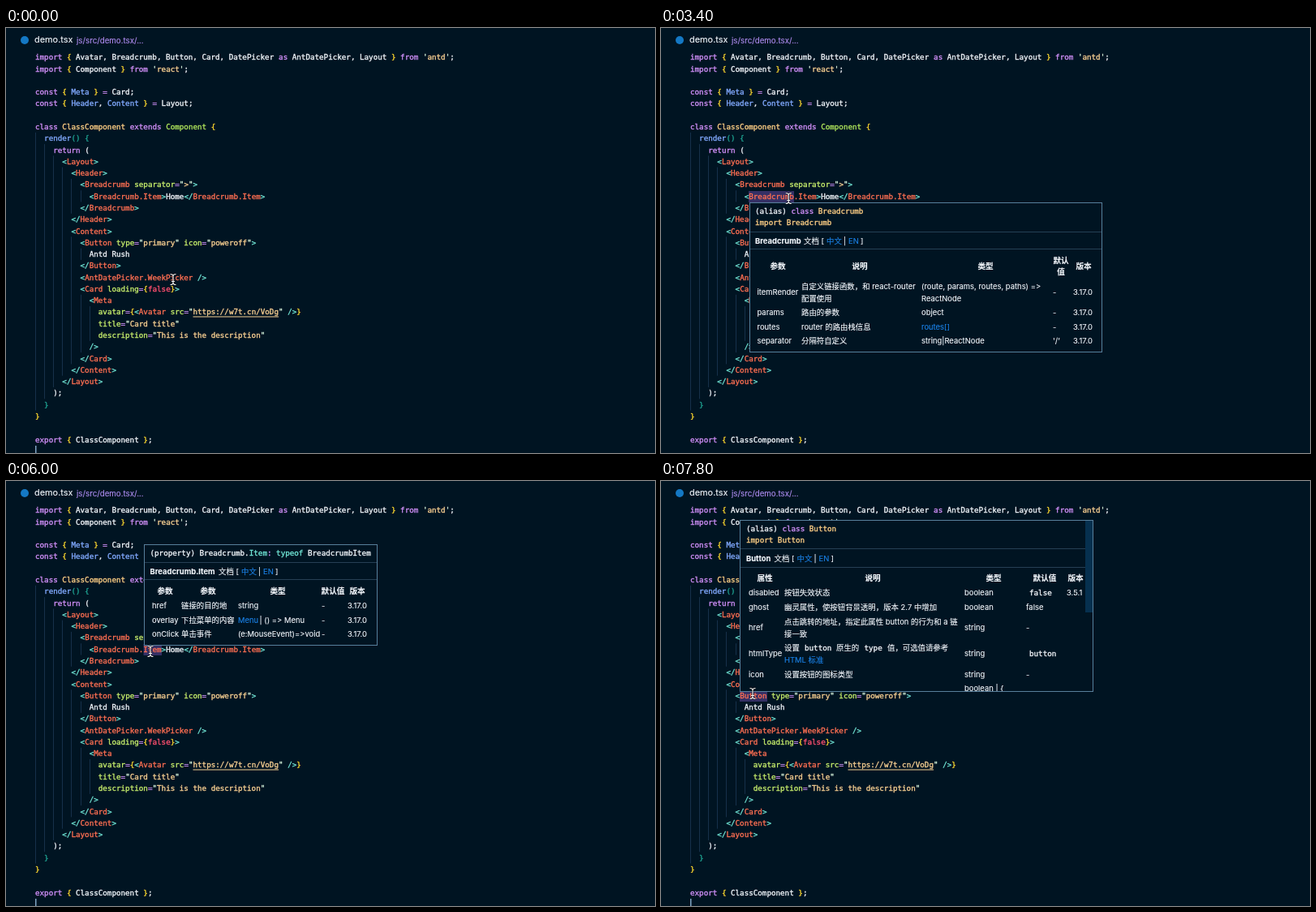
These frames come from a looping animation (800x524 px, 8000 ms). An HTML page with a canvas:

```html
<!DOCTYPE html>
<html lang="en">
<head>
<meta charset="utf-8">
<title>Editor hover docs</title>
<style>
html, body { margin: 0; width: 100%; height: 100%; overflow: hidden; background: #001422; }
canvas { display: block; width: 800px; height: 524px; }
</style>
</head>
<body>
<canvas id="stage" width="800" height="524"></canvas>
<script>
const ctx = document.getElementById('stage').getContext('2d');
const LOOP = 8000, STEP = 200;
const BG = '#001422', TEXT = '#f2f5fa', LINK = '#1a80e6', RULE = '#263f54', BORDER = '#587f9b';
const MONO = '9.23px "DejaVu Sans Mono", monospace';
const CHAR = 5.557, ROW = 14.28, LEFT = 36, TOP = 36;

// One-letter colour codes used by the tokens below
const COLORS = {
  w: TEXT, k: '#d290fa', y: '#ffd92e', b: '#82aaff', c: '#ffcf85', g: '#b0e65c',
  t: '#72e8d8', o: '#ff6f52', a: '#c8ee6c', s: '#fad092', q: '#dcf8e0', r: '#ff4f70', d: '#1fa392'
};

// Each line: indent, then tokens split by "|", each led by its colour code
const open = name => `t<|o${name}|t>`;
const close = name => `t</|o${name}|t>`;
const str = text => `q"|s${text}|q"`;
const code = [
  [0, "kimport |y{|w Avatar, Breadcrumb, Button, Card, DatePicker |kas|w AntDatePicker, Layout |y}|k from |q'|santd|q'|w;"],
  [0, "kimport |y{|w Component |y}|k from |q'|sreact|q'|w;"],
  [0, ''],
  [0, 'kconst |y{|b Meta |y}|k = |wCard;'],
  [0, 'kconst |y{|b Header|w,|b Content |y}|k = |wLayout;'],
  [0, ''],
  [0, 'kclass |cClassComponent|k extends |gComponent |y{'],
  [2, 'brender|d() {'],
  [4, 'kreturn |w('],
  [6, open('Layout')],
  [8, open('Header')],
  [10, `t<|oBreadcrumb |aseparator|k=|${str('>')}|t>`],
  [12, `${open('Breadcrumb.Item')}|wHome|${close('Breadcrumb.Item')}`],
  [10, close('Breadcrumb')],
  [8, close('Header')],
  [8, open('Content')],
  [10, `t<|oButton |atype|k=|${str('primary')}|a icon|k=|${str('poweroff')}|t>`],
  [12, 'wAntd Rush'],
  [10, close('Button')],
  [10, 't<|oAntDatePicker.WeekPicker |t/>'],
  [10, 't<|oCard |aloading|k=|y{|rfalse|y}|t>'],
  [12, 't<|oMeta'],
  [14, `aavatar|k=|y{|t<|oAvatar |asrc|k=|${str('https://w7t.cn/VoDg')}|t />|y}`],
  [14, `atitle|k=|${str('Card title')}`],
  [14, `adescription|k=|${str('This is the description')}`],
  [12, 't/>'],
  [10, close('Card')],
  [8, close('Content')],
  [6, close('Layout')],
  [4, 'w);'],
  [2, 'd}'],
  [0, 'y}'],
  [0, ''],
  [0, 'kexport |y{|w ClassComponent |y}|w;']
];

// Indent guides: indent level, first line, last line
const guides = [
  [0, 7, 30], [1, 8, 29], [2, 9, 28], [3, 10, 27],
  [4, 11, 13], [4, 16, 26], [5, 12, 12], [5, 17, 17], [5, 21, 25], [6, 22, 24]
];

// Filled text with a hairline outline for a slightly heavier stroke
function ink(text, x, y, color, weight) {
  ctx.fillStyle = ctx.strokeStyle = color;
  ctx.lineWidth = weight;
  ctx.lineJoin = 'round';
  ctx.fillText(text, x, y);
  ctx.strokeText(text, x, y);
}

function mono(tokens, x, y) {
  ctx.font = MONO;
  for (const token of tokens.split('|')) {
    if (!token) continue;
    ink(token.slice(1), x, y + 3.3, COLORS[token[0]], 0.35);
    x += (token.length - 1) * CHAR;
  }
}

function sans(text, x, y, { color = TEXT, size = 9.4, bold = false, align = 'left' } = {}) {
  ctx.font = `${bold ? 700 : 400} ${size}px Inter, "Noto Sans CJK SC", "Noto Sans CJK", sans-serif`;
  ctx.textAlign = align;
  ctx.letterSpacing = '0.02px'; // keeps "=>" from joining into an arrow
  ink(text, x, y + 3.4, color, 0.15);
  ctx.letterSpacing = '0px';
  ctx.textAlign = 'left';
}

function rect(x, y, w, h, color) {
  ctx.fillStyle = color;
  ctx.fillRect(x, y, w, h);
}

function heads(y, ...cells) {
  for (const [text, x, dy = 0] of cells) sans(text, x, y + dy, { bold: true, align: 'center', size: 9.6 });
}

// Places the cells of a table row at the given column positions
function row(y, columns, ...cells) {
  cells.forEach((cell, i) => {
    if (!cell) return;
    const lines = cell.split('\n');
    lines.forEach((line, n) => sans(line, columns[i], y + (n - (lines.length - 1) / 2) * 14.2));
  });
}

function docTitle(name, x, docX, y) {
  sans(name, x, y, { bold: true });
  sans('文档 [', docX, y);
  sans('中文', docX + 28, y, { color: LINK });
  sans('|', docX + 49, y);
  sans('EN', docX + 55, y, { color: LINK });
  sans(']', docX + 70, y);
}

function panel(x, y, w, h, rules, body) {
  ctx.save();
  rect(x, y, w, h, BG);
  ctx.beginPath();
  ctx.rect(x, y, w, h);
  ctx.clip();
  for (const ruleY of rules) rect(x, ruleY, w, 1, RULE);
  body();
  ctx.strokeStyle = BORDER;
  ctx.lineWidth = 1;
  ctx.lineJoin = 'miter';
  ctx.strokeRect(x + 0.5, y + 0.5, w - 1, h - 1);
  ctx.restore();
}

function breadcrumbDocs() {
  panel(109, 215, 435, 185, [251, 272], () => {
    mono('w(alias) |kclass |cBreadcrumb', 116, 226);
    mono('cimport Breadcrumb', 116, 240);
    docTitle('Breadcrumb', 116, 176, 263);
    heads(294, ['参数', 144], ['说明', 245], ['类型', 400], ['默认', 493, -7], ['值', 493, 7], ['版本', 521]);
    const cols = [118.5, 173, 321, 483, 508];
    row(326, cols, 'itemRender', '自定义链接函数，和 react-router\n配置使用',
      '(route, params, routes, paths) =>\nReactNode', '-', '3.17.0');
    row(351, cols, 'params', '路由的参数', 'object', '-', '3.17.0');
    row(368.5, cols, 'routes', 'router 的路由栈信息', '', '-', '3.17.0');
    sans('routes[]', 321, 368.5, { color: LINK });
    row(386, cols, 'separator', '分隔符自定义', 'string|ReactNode', "'/'", '3.17.0');
  });
}

function itemDocs() {
  panel(170, 78, 288, 125, [100, 121], () => {
    mono('w(property) Breadcrumb.|tItem|k: |ttypeof |wBreadcrumbItem', 177.5, 89);
    docTitle('Breadcrumb.Item', 177.5, 262, 112);
    heads(136, ['参数', 196], ['参数', 249], ['类型', 335], ['默认值', 403], ['版本', 433]);
    const cols = [180, 216, 286, 389, 421];
    row(154, cols, 'href', '链接的目的地', 'string', '-', '3.17.0');
    row(171.5, cols, 'overlay', '下拉菜单的内容', '', '-', '3.17.0');
    sans('Menu', 286, 171.5, { color: LINK });
    sans('| () => Menu', 312.5, 171.5);
    row(189, cols, 'onClick', '单击事件', '(e:MouseEvent)=>void', '-', '3.17.0');
  });
}

function buttonDocs() {
  panel(97, 48, 436, 212, [83, 106], () => {
    mono('w(alias) |kclass |cButton', 105, 59);
    mono('cimport Button', 105, 73);
    docTitle('Button', 105, 139.5, 96);
    heads(120, ['属性', 128], ['说明', 261], ['类型', 410], ['默认值', 473], ['版本', 511]);
    const cols = [108, 152, 374, 450, 500];
    row(138, cols, 'disabled', '按钮失效状态', 'boolean', '', '3.5.1');
    mono('wfalse', 454, 138);
    row(156, cols, 'ghost', '幽灵属性，使按钮背景透明，版本 2.7 中增加', 'boolean', 'false');
    row(181, cols, 'href', '点击跳转的地址，指定此属性 button 的行为和 a 链\n接一致', 'string', '-');
    row(213, cols, 'htmlType', '', 'string');
    mono('wbutton', 454, 213);
    sans('设置', 152, 206);
    mono('wbutton', 177, 206);
    sans('原生的', 216, 206);
    mono('wtype', 250.5, 206);
    sans('值，可选值请参考', 279, 206);
    sans('HTML 标准', 152, 220.5, { color: LINK });
    row(239, cols, 'icon', '设置按钮的图标类型', 'string', '-');
    sans('boolean | {', 374, 256);
    rect(523, 49, 9, 113, '#06304f');
  });
}

// Hover cards: start, end, highlighted word box, painter
const hovers = [
  { from: 1000, to: 3600, word: [108, 201, 56, 14], draw: breadcrumbDocs },
  { from: 3935, to: 6400, word: [169.5, 201, 22.5, 14], draw: itemDocs },
  { from: 7335, to: LOOP, word: [97, 258, 34, 14], draw: buttonDocs }
];

// Pointer path: time, x, y
const path = [
  [0, 206, 310], [700, 146, 210], [3200, 146, 210], [3700, 178, 210],
  [6200, 178, 210], [6600, 151, 229], [7000, 113, 262], [LOOP, 113, 262]
];

function pointerAt(t) {
  const i = path.findIndex(p => p[0] > t);
  const [t0, x0, y0] = path[i - 1], [t1, x1, y1] = path[i];
  const u = (t - t0) / (t1 - t0), e = u * u * (3 - 2 * u);
  return [x0 + (x1 - x0) * e, y0 + (y1 - y0) * e];
}

function drawPointer(x, y) {
  ctx.beginPath();
  ctx.moveTo(x - 3.5, y - 6.5);
  ctx.quadraticCurveTo(x, y - 6.5, x, y - 4);
  ctx.quadraticCurveTo(x, y - 6.5, x + 3.5, y - 6.5);
  ctx.moveTo(x, y - 4.5);
  ctx.lineTo(x, y + 4.5);
  ctx.moveTo(x - 3.5, y + 6.5);
  ctx.quadraticCurveTo(x, y + 6.5, x, y + 4);
  ctx.quadraticCurveTo(x, y + 6.5, x + 3.5, y + 6.5);
  ctx.moveTo(x - 2, y + 2.5);
  ctx.lineTo(x + 2, y + 2.5);
  for (const [width, color] of [[2.6, 'rgba(0,0,0,.65)'], [1.2, '#f4f4f4']]) {
    ctx.lineWidth = width;
    ctx.strokeStyle = color;
    ctx.stroke();
  }
}

function drawEditor() {
  ctx.fillStyle = '#1478c4';
  ctx.beginPath();
  ctx.arc(23, 15, 5, 0, Math.PI * 2);
  ctx.fill();
  sans('demo.tsx', 35, 15, { size: 10.9 });
  sans('js/src/demo.tsx/...', 87, 15.3, { size: 9.7, color: '#b08cf0' });

  for (const [level, first, last] of guides) {
    rect(Math.round(LEFT + level * 2 * CHAR), TOP + (first - 0.5) * ROW, 1, (last - first + 1) * ROW, '#16304a');
  }
  code.forEach(([indent, tokens], i) => mono(tokens, LEFT + indent * CHAR, TOP + i * ROW));
  rect(LEFT + 35 * CHAR, 355.5, 19 * CHAR, 1, COLORS.s);
}

function draw(t) {
  rect(0, 0, 800, 524, BG);
  const hover = hovers.find(h => t >= h.from && t < h.to);
  if (hover) rect(...hover.word, 'rgba(126,87,194,.42)');
  drawEditor();
  if ((t + 450) % 1000 < 500) rect(36, 515, 1.5, 9, '#80a4c2');
  if (hover) {
    ctx.globalAlpha = Math.min(1, (t - hover.from) / 100 || 1);
    hover.draw();
    ctx.globalAlpha = 1;
  }
  drawPointer(...pointerAt(t));
}

let shown = -1;
function tick() {
  const t = Math.floor(performance.now() % LOOP / STEP) * STEP;
  if (t !== shown) draw(shown = t);
  requestAnimationFrame(tick);
}
tick();
</script>
</body>
</html>
```
